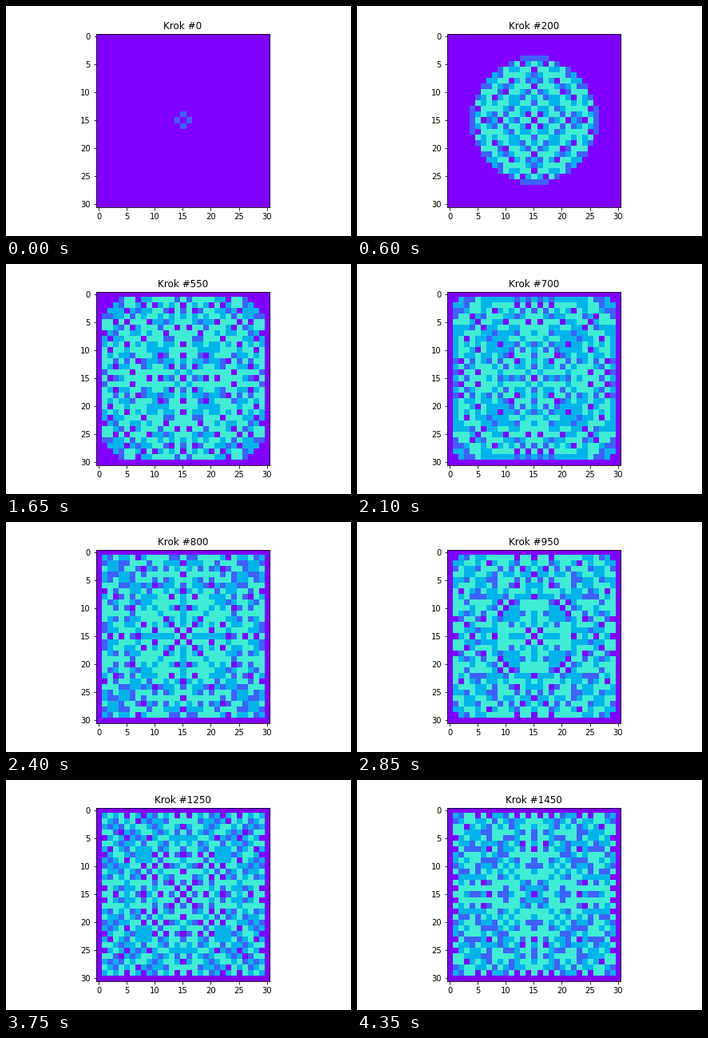
Recreate the animation shown at these times as a matplotlib script. Size 432 px wide and 288 px high, loop 4.5 s.

```python
import numpy as np
import matplotlib.pyplot as plt
from matplotlib.animation import FuncAnimation

SIZE = 31
MID = SIZE // 2
FRAMES = 30
INTERVAL = 150
STEPS_PER_FRAME = 50
GRAINS_PER_STEP = 4


def relax(pile):
    """Topple every cell holding four or more grains; the border is a sink."""
    while pile.max() >= 4:
        fall = pile // 4
        pile -= 4 * fall
        pile[1:] += fall[:-1]
        pile[:-1] += fall[1:]
        pile[:, 1:] += fall[:, :-1]
        pile[:, :-1] += fall[:, 1:]
        pile[[0, -1]] = 0
        pile[:, [0, -1]] = 0


def sandpile_states():
    # Toppling order does not matter, so a frame's grains can drop together.
    pile = np.zeros((SIZE, SIZE), dtype=int)
    states = []
    for i in range(FRAMES):
        steps = STEPS_PER_FRAME if i else 1
        pile[MID, MID] += GRAINS_PER_STEP * steps
        relax(pile)
        states.append(pile.copy())
    return states


states = sandpile_states()

plt.rcParams.update({"font.family": "DejaVu Sans", "font.size": 10})
fig, ax = plt.subplots(figsize=(6, 4), dpi=72)
fig.subplots_adjust(left=0.125, right=0.9, bottom=0.125, top=0.88)
image = ax.imshow(states[0], cmap="rainbow", vmin=0, vmax=8,
                  interpolation="nearest")
ax.set_xticks(range(0, SIZE, 5))
ax.set_yticks(range(0, SIZE, 5))
title = ax.set_title("Krok #0", fontsize=12)


def update(i):
    image.set_data(states[i])
    title.set_text(f"Krok #{i * STEPS_PER_FRAME}")
    return image, title


anim = FuncAnimation(fig, update, frames=FRAMES, interval=INTERVAL,
                     repeat=True, repeat_delay=0, blit=False)
plt.show()
```
